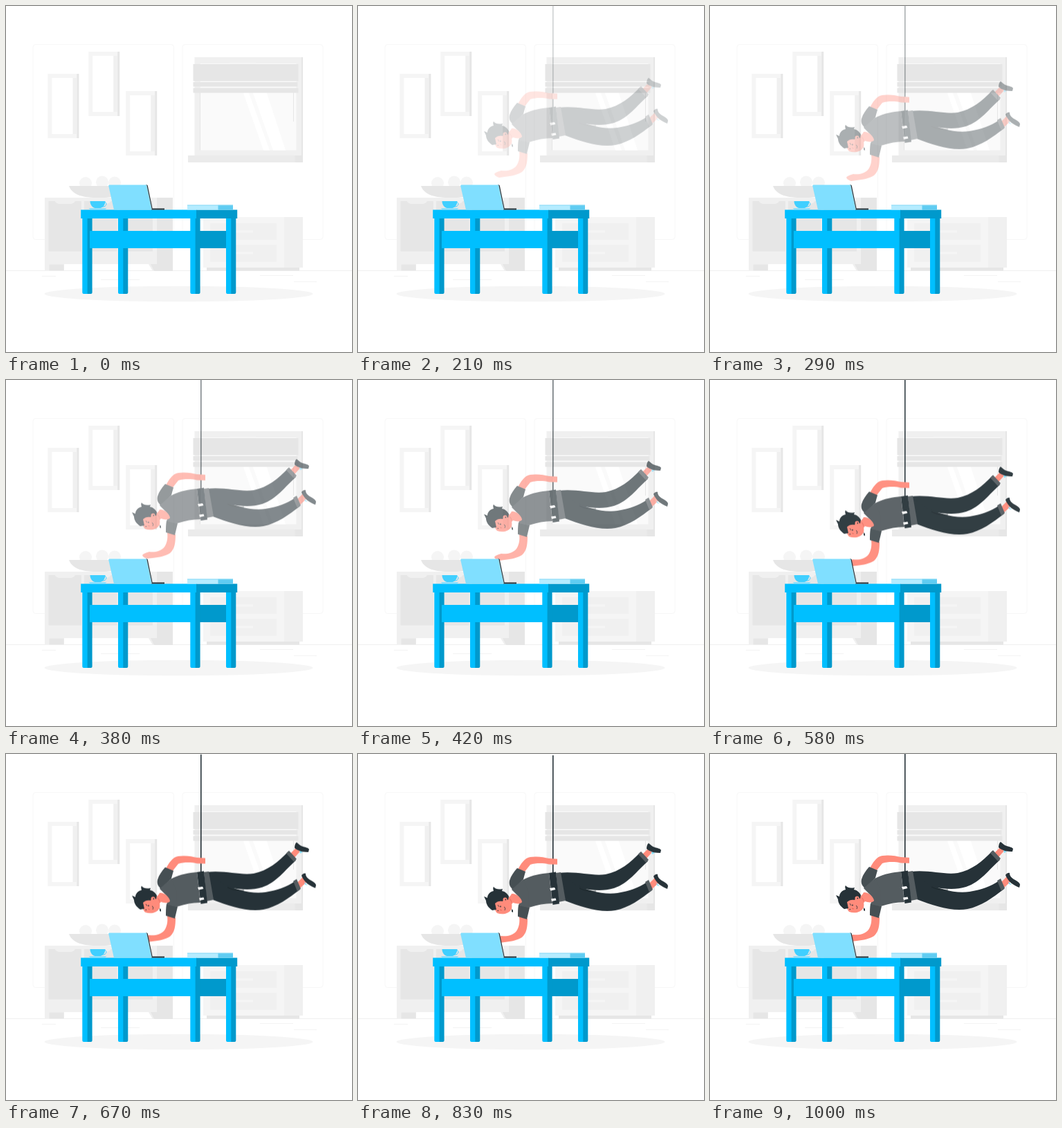
These frames come from a looping animation (500 by 500 pixels, 1.04 s). An HTML page:

```html
<!DOCTYPE html>
<html lang="en">
<head>
<meta charset="utf-8">
<title>Hanging by a rope</title>
<style>
  html, body { margin: 0; width: 100%; height: 100%; overflow: hidden; background: #fff; }
  svg { display: block; width: 100%; height: 100%; }
  .a { fill: #fafafa } .b { fill: #f5f5f5 } .c { fill: #f0f0f0 } .d { fill: #ebebeb } .e { fill: #e6e6e6 }
  .blue { fill: #00bfff } .deep { fill: #0099cc } .pale { fill: #80dfff }
  .ink { fill: #263238 } .shirt { fill: #545c60 } .sleeve { fill: #464f53 } .skin { fill: #ff8b7b }
  .white { fill: #fff }
  .line { fill: none; stroke: #263238 }
</style>
</head>
<body>
<svg viewBox="0 0 500 500">
  <defs>
    <g id="frame">
      <path class="e" d="M41 0h4v93h-4z"/>
      <path class="b" d="M0 0h42v93H0z"/>
      <path class="c" d="M36 6h6v81h-6z"/>
      <path class="white" d="M6 6h30v81H6z"/>
    </g>
    <g id="leg">
      <path class="blue" d="M0 0h8v109H2q-2 0-2-2z"/>
      <path class="deep" d="M7.3 0H14.3v107q0 2-2 2h-5z"/>
    </g>
  </defs>

  <!-- room -->
  <g fill="none" stroke="#f7f7f7">
    <rect x="39" y="55.5" width="203.5" height="282" rx="4"/>
    <rect x="255" y="55.5" width="203" height="282" rx="4"/>
    <path stroke="#f0f0f0" d="M0 382.5h500"/>
    <path stroke="#f3f3f3" d="M416 398.5h33M367 389.5h48M52 390.5h20M137 395.5h56"/>
  </g>
  <use href="#frame" x="60.4" y="98"/>
  <use href="#frame" x="119.2" y="66"/>
  <use href="#frame" x="173.2" y="123"/>

  <!-- window -->
  <path class="e" d="M426 74h3v152h-3z"/>
  <path class="c" d="M272.500 74h154.500v142H272.500z"/>
  <path class="a" d="M281 83h138.500v125.500H281z"/>
  <path class="white" d="M341 120h8l32 88.500h-9zM355 120h20l29 88.500h-18z"/>
  <path class="e" d="M280 124h1v84.500h-1z"/>
  <path class="d" d="M263 216h155v10H263z"/>
  <path class="e" d="M417.500 216h9.500v10h-9.500z"/>
  <path class="b" d="M323 82h38v2h-38z"/>
  <path class="e" d="M270.500 84h152v24.500h-152zM270.500 110h151v6.500h-151zM270.500 118.500h152v7h-152z"/>
  <path class="e" d="M415 125h1v42h-1z"/>

  <!-- sideboard and bowl -->
  <g class="b">
    <circle cx="115" cy="256" r="9"/><circle cx="139" cy="254.500" r="9"/><circle cx="157" cy="255.500" r="9"/>
  </g>
  <path class="e" d="M91 260h85c-3 11-16 17-37 17h-8c-24 0-36-6-40-17z"/>
  <path class="e" d="M217 277h24v106h-29l-4-10h9z"/>
  <path class="c" d="M56 277h162v96h-9l5 10h-2l-6-10H84v10H56z"/>
  <path class="white" d="M56 382.900h27v1H56z"/>
  <path class="e" d="M62.500 373.500h21v9h-21z"/>
  <path class="e" id="door" d="M61.500 282h9c3 5 8 4 14.500 4s12 1 15-4h9v72.500H61.500z"/>
  <use href="#door" x="51.500"/><use href="#door" x="103"/>

  <!-- drawers -->
  <path class="e" d="M290 378h134v4.500H290z"/>
  <path class="b" d="M285 305h118v73H285z"/>
  <path class="c" d="M402 305h27v73h-27z"/>
  <path class="c" d="M295 314h96v24h-96zM295 345h96v24.500h-96z"/>
  <path class="b" d="M330 324.500h27v3h-27zM330 355.500h27v3h-27z"/>

  <ellipse class="b" cx="249.500" cy="416" rx="194" ry="11.300"/>

  <!-- hanging man -->
  <g id="man">
    <path class="line" stroke-width="1.600" d="M281.800 0v172"/>
    <path class="skin" d="M411 143l7-7 7 4-8 9zM420 186l9-9 6 7-10 9z"/>
    <path class="pale" d="M424 139l5 2-4 2zM431 184l5 5-4-1z"/>
    <path class="ink" d="M417 135c0-3 1-7 3-8 3 2 5 5 9 6 4 1 8 2 9 4l-1 4c-7 0-15-1-20-6z"/>
    <path class="ink" d="M427 175c1-2 4-4 6-3 0 4 2 6 6 9 5 3 9 5 9 8l-1 4c-8-3-16-8-20-18z"/>
    <path class="ink" d="M290 170c27-3 48 5 68 2 20-4 36-17 50-32l11 13c-16 14-28 32-49 39-22 7-50 0-74-5z"/>
    <path class="ink" d="M292 171l22 16c18 8 40 15 61 12 18-3 29-7 43-16l7 12c-17 13-33 25-53 29-22 4-50-5-73-14z"/>
    <path fill="none" stroke="#1b2428" stroke-width=".7" d="M320 192c8 4 15 5 24 4"/>
    <path class="shirt" d="M405 143l4-4 11 12-4 4zM415 183l5-3 6 14-5 4z"/>
    <path class="shirt" d="M286 170l7-1 7 41-10 2z"/>

    <path class="skin" d="M231 165c4-8 10-17 18-18 11-1.500 20 .5 27 2l12 .8v8l-12-.3c-9-2-19-2-27 .5l-8 10z"/>
    <path class="skin" d="M233 233c1 8 0 15-4 21-6 7-15 8-22 7-4 1-9 3-10 5 1 3 4 4 7 5l8-1c10-1 18-3 25-7 7-6 8-16 8-27z"/>
    <path class="shirt" d="M240 179c12-6 24-8 36-9l5 44c-11 0-22 2-34 6l-14-4c2-7 2-12 0-16l-11-7z"/>
    <path class="sleeve" d="M230 163l12 5-3 11c-5 5-10 10-15 15-5-4-6-8-5-13 2-7 6-12 11-18z"/>
    <path class="sleeve" d="M232 216c5 1 11 3 16 4l-4 17-13-4c0-6 0-11 1-17z"/>
    <path class="shirt" d="M239 179l8 20-1 21-14-3c3-7 1-12-1-14l-9-9z"/>

    <path class="skin" d="M215 207c3-2 6-4 7-7 7-1 15 7 15 12-3 4-9 2-13 1l-6 6z"/>
    <path fill="#ed7465" d="M217 207c4 0 6 3 5 9l-4 2z"/>
    <path class="skin" d="M197 212c7-5 15-7 21-5 4 4 5 10 4 15-4 7-13 9-21 6-3-3-5-9-4-16z"/>
    <path class="ink" d="M182 204l5 2c0-5 4-9 9-10-1-3-1-5 0-6 3 4 8 4 13 3l-1 3c5 1 8 4 10 8l-1 5c-4-2-7-1-8 2-4-1-8 0-11 3l2 9-6 1c-6-4-9-9-9-14z"/>
    <circle class="skin" cx="212.500" cy="208.500" r="3"/>
    <circle class="ink" cx="213.300" cy="208.500" r=".9"/>
    <circle class="ink" cx="206" cy="218.500" r=".9"/>
    <circle class="ink" cx="202.300" cy="224.500" r=".8"/>
    <path class="line" stroke-width=".8" d="M202 216l2 3M211 219c2 1 2 3 1 5"/>
    <path fill="none" stroke="#dc5b50" stroke-width=".8" d="M205 223l3 1"/>
    <path class="ink" d="M222 222l2 2v3l-2-1z"/>

    <path class="ink" d="M276 170l10-1.500 5 46-9.500 1.500z"/>
    <path class="white" d="M277 192l7-1 1.500 3-7 1.800zM279 207.500l6.500-1 1 3-6.500 1.500z"/>
  </g>

  <!-- table -->
  <use href="#leg" x="110.300" y="307"/>
  <use href="#leg" x="162" y="307"/>
  <path class="deep" d="M274 325h47v25h-47z"/>
  <path class="blue" d="M121 325h153v25H121z"/>
  <use href="#leg" x="266.300" y="307"/>
  <use href="#leg" x="318" y="307"/>
  <path class="blue" d="M108.200 294.500H276v12.500H108.200z"/>
  <path class="deep" d="M275 294.500h59.200v12.500H275z"/>

  <!-- laptop, cup, books -->
  <path class="ink" d="M202 258.500h1.500q1 0 1.300 1l6.800 33h17.400v2H210z"/>
  <path class="pale" d="M149.500 258.500h53.500l7.500 36H156l-7.800-34.500q0-1.500 1.300-1.500z"/>
  <path fill="none" stroke="#c4f0ff" stroke-width=".6" d="M203 259l7.500 35"/>
  <path fill="none" stroke="#40cfff" d="M141 284c6-2 5 7-2 6"/>
  <path fill="#40cfff" d="M121.500 282h22c0 5-3 9-7 10h-8c-4-1-7-5-7-10z"/>
  <path class="pale" d="M119.500 292.200h26l-3 2.300h-20z"/>
  <path fill="#b5ecff" d="M262 287.500h45v7h-45z"/>
  <path fill="#5fccf2" d="M306.500 287.500H328v7h-21.500z"/>
  <path fill="#8fdcf5" d="M262 287.500h66v1h-66z"/>
</svg>
<script>
  const LOOP = 1040, FPS = 24, LAST = 24, FIRST_SEEN = 3;
  const man = document.getElementById('man');
  const slide = man.animate([
    { opacity: 0, transform: 'translateY(-30px)' },
    { opacity: 1, transform: 'translateY(0px)' }
  ], { duration: 1000, easing: 'cubic-bezier(.36,-.01,.5,1.38)', fill: 'both' });
  slide.pause();

  // Steps run at 24 per second, rounded to 10 ms.
  const stepTime = n => Math.round(n * 100 / FPS) * 10;
  const start = performance.now();

  function draw() {
    const t = (performance.now() - start) % LOOP;
    let n = LAST;
    while (n > 0 && stepTime(n) > t) n--;
    slide.currentTime = n < FIRST_SEEN ? 0 : (n + 1) * 1000 / FPS;
    requestAnimationFrame(draw);
  }
  draw();
</script>
</body>
</html>
```
